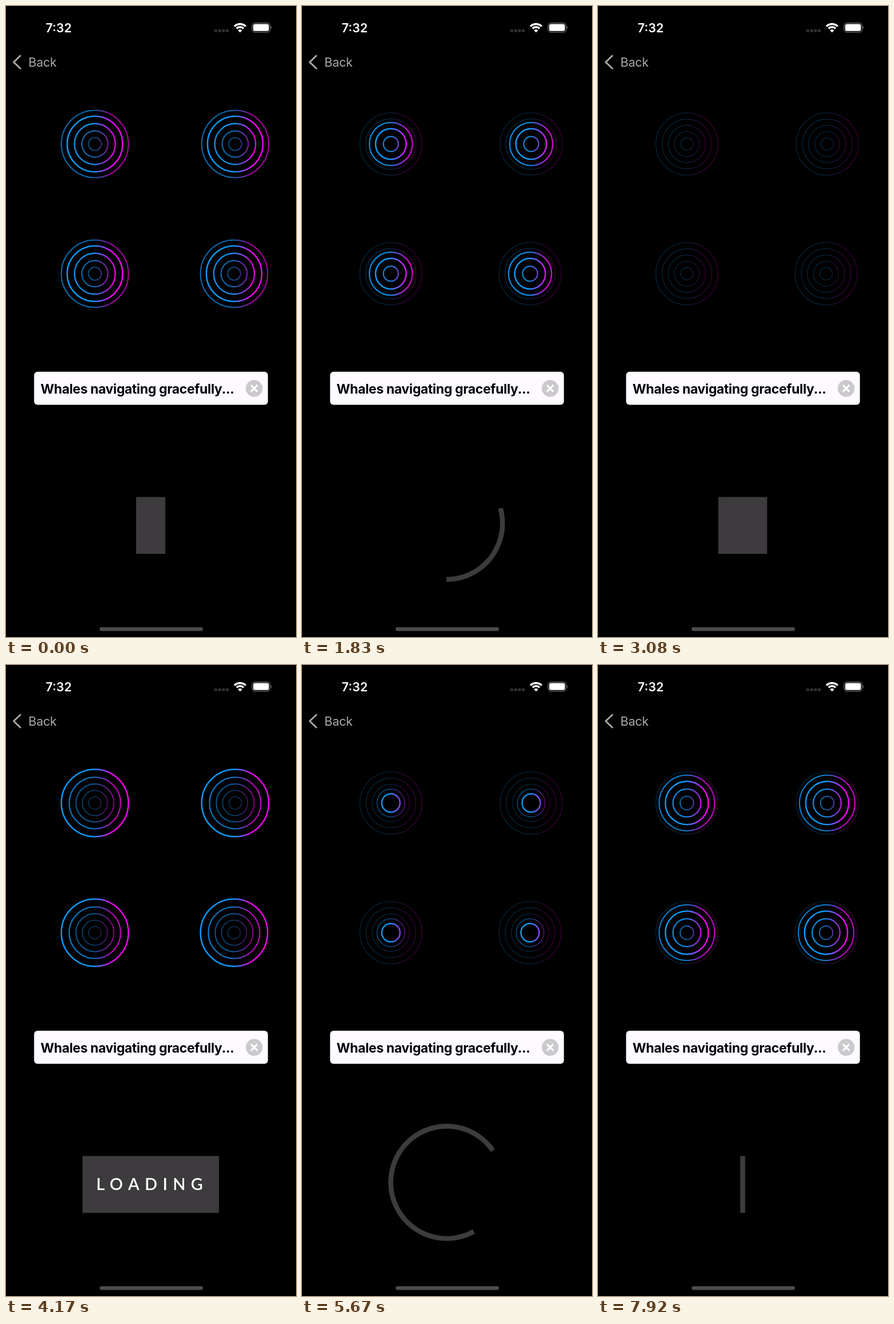
Write an HTML page that moves like this. It is 508x1102 px and loops after 8 s.

```html
<!DOCTYPE html>
<html lang="en">
<head>
<meta charset="utf-8">
<title>Loading</title>
<style>
  html, body { margin: 0; width: 100%; height: 100%; overflow: hidden; background: #000; }
  svg { display: block; width: 100vw; height: 100vh; }
  text { font-family: Inter, Roboto, sans-serif; }
  .loading { font: 600 29px Lato, sans-serif; letter-spacing: 9.4px; fill: #fff; }
</style>
</head>
<body>
<svg viewBox="0 0 508 1102" fill="none">
  <rect width="508" height="1102" fill="#000"/>

  <text x="69.5" y="46" font-size="21.5" font-weight="600" fill="#fff">7:32</text>
  <path d="M365 43.3H390" stroke="#333" stroke-width="4.6" stroke-dasharray="5 1.7"/>
  <g stroke="#fff" stroke-width="3.4">
    <path d="M400.1 35.6A14 14 0 0 1 419.9 35.6"/>
    <path d="M403.8 39.3A8.8 8.8 0 0 1 416.2 39.3"/>
  </g>
  <path d="M410 46.3L406.3 42.4A5.2 5.2 0 0 1 413.7 42.4Z" fill="#fff"/>
  <rect x="431" y="29.6" width="31.6" height="16.2" rx="5" stroke="#707070" stroke-width="1.2"/>
  <rect x="433" y="31.6" width="27.6" height="12.2" rx="3.4" fill="#fff"/>
  <path d="M464 35.2Q467 37.7 464 40.2Z" fill="#707070"/>

  <path d="M25 87L13.5 98L25 109" stroke="#a9a9a9" stroke-width="3" stroke-linecap="round" stroke-linejoin="round"/>
  <text x="39.3" y="106" font-size="21.5" letter-spacing="-.2" fill="#a9a9a9">Back</text>

  <g id="ripples"></g>

  <rect x="49.2" y="638.8" width="409.6" height="57.7" rx="6" fill="#fdfbff"/>
  <text x="60.5" y="677" font-size="23" font-weight="700" letter-spacing="-.36" fill="#050308">Whales navigating gracefully...</text>
  <circle cx="434.7" cy="667.8" r="14.7" fill="#cbc9cc"/>
  <path d="M430 663L439.4 672.6M439.4 663L430 672.6" stroke="#fff" stroke-width="3.2" stroke-linecap="round"/>

  <path id="arc" stroke="#3c3c3c" stroke-width="8.6"/>
  <rect id="box" y="857.5" height="99.3" fill="#3d3b3d"/>
  <text id="word" class="loading" x="158" y="916.5">LOADING</text>

  <rect x="164" y="1085" width="181" height="6.6" rx="3.3" fill="#4c4c4c"/>
</svg>
<script>
const LOOP = 8000, STEP = 1000 / 12;
const RIPPLE = 2000, LOADER = 5000;
const CX = 253.5, CY = 903.5, R = 98;
const LINE_END = 956.8, LINE_LEN = 99.3;
const NS = 'http://www.w3.org/2000/svg';
const $ = id => document.getElementById(id);

function set(el, attrs) {
  for (const k in attrs) el.setAttribute(k, attrs[k]);
}
function make(tag, attrs, parent) {
  const el = document.createElementNS(NS, tag);
  set(el, attrs);
  return parent.appendChild(el);
}
const clamp = (v, lo = 0, hi = 1) => Math.max(lo, Math.min(hi, v));

// Ripples: each ring swells and glows in turn, from the inside out
const CENTRES = [[155.7, 241], [401.5, 241], [155.7, 467.5], [399.5, 467.5]];
const rings = [];
CENTRES.forEach(([x, y], n) => {
  const grad = make('linearGradient', {
    id: 'g' + n, gradientUnits: 'userSpaceOnUse', x1: x - 3, x2: x + 30, y1: 0, y2: 0
  }, $('ripples'));
  make('stop', { offset: 0, 'stop-color': '#0c9bfb' }, grad);
  make('stop', { offset: 1, 'stop-color': '#f203ee' }, grad);
  for (let i = 0; i < 5; i++) {
    const el = make('circle', { cx: x, cy: y, stroke: `url(#g${n})` }, $('ripples'));
    rings.push({ el, i });
  }
});

function drawRipples(t) {
  for (const { el, i } of rings) {
    const q = (t + 475 - 100 * i + RIPPLE) % RIPPLE;
    const swell = 5 * Math.min(1, q / 85, Math.exp((230 - q) / 90));
    const rise = 1 - (1 - clamp(q / 170)) ** 2;
    const glow = Math.max(.22, Math.min(rise, Math.exp((250 - q) / 350)));
    set(el, {
      r: 11 + 10.85 * i + swell,
      'stroke-width': 1.1 + 1.4 * glow,
      'stroke-opacity': glow
    });
  }
}

// Loader: a line bends into an arc, closes to a ring, opens again,
// straightens and widens into a box with the word
const PEAK = 1125, HALF = 822;

function arcPath(t) {
  const u = clamp((t - PEAK) / HALF, -.858, .858);
  const head = 39.5 - 20 * u - 60 * u ** 3;
  const span = 360 * (1 - Math.abs(u) ** 2.27);
  const bend = clamp(Math.min((t - 420) / 140, (2900 - t) / 1070));
  // s runs upwards along the line, so it starts at the arc's lower end
  const start = u < 0 ? head : head + span;
  const turn = u < 0 ? span : -span;
  const pts = [];
  for (let s = 0; s <= 1; s += 1 / 128) {
    const a = (start + turn * s) * Math.PI / 180;
    const x = CX + bend * R * Math.cos(a);
    const y = (1 - bend) * (LINE_END - LINE_LEN * s) + bend * (CY + R * Math.sin(a));
    pts.push(x.toFixed(2) + ' ' + y.toFixed(2));
  }
  return 'M' + pts.join('L');
}

function drawLoader(time) {
  let t = time % LOADER;
  if (t < 90) t += LOADER;
  const boxed = t >= 2920;
  const w = 9 + 230 * clamp(Math.min(t - 2920, 5090 - t) / 490);
  set($('box'), { x: CX - w / 2, width: boxed ? w : 0 });
  set($('arc'), { d: boxed ? '' : arcPath(t) });
  set($('word'), { opacity: clamp(Math.min((t - 3430) / 370, (4600 - t) / 300)) });
}

function draw(now) {
  const t = Math.floor(((now + 5) % LOOP) / STEP) * STEP;
  drawRipples(t);
  drawLoader(t);
}

const begin = performance.now();
function tick() {
  draw(performance.now() - begin);
  requestAnimationFrame(tick);
}
draw(0);
requestAnimationFrame(tick);
</script>
</body>
</html>
```
